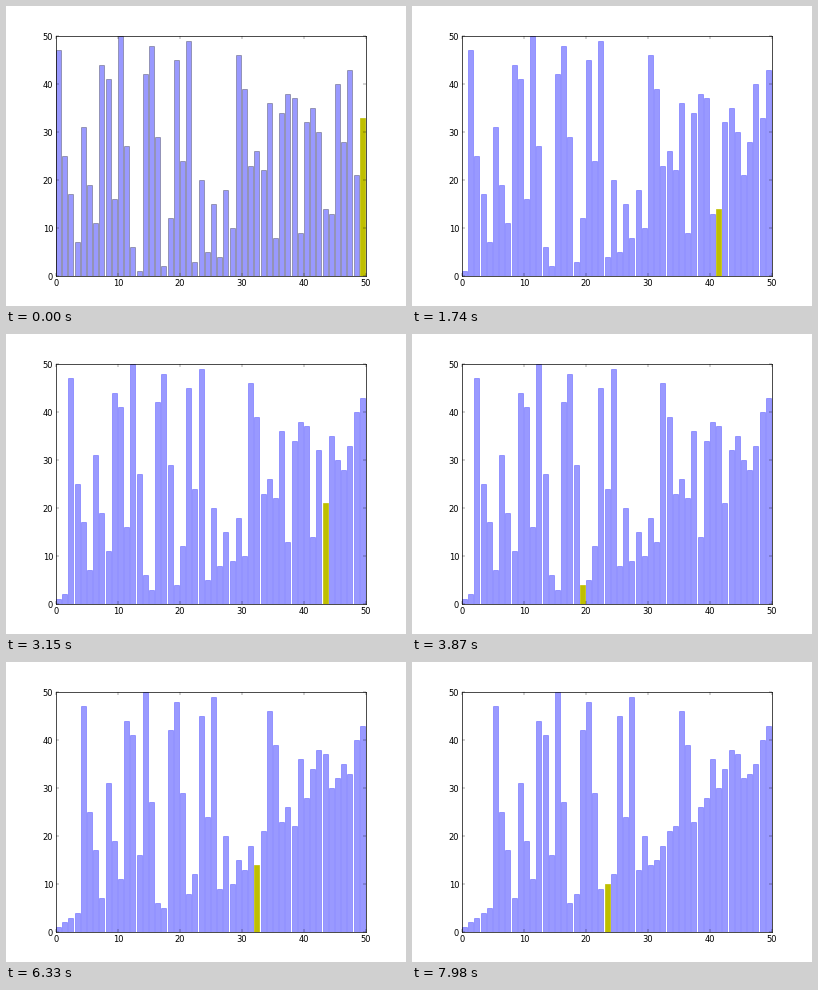
A matplotlib script for the animation above (8000 ms loop, 400 by 300 pixels).

```python
import matplotlib.pyplot as plt
from matplotlib.animation import FuncAnimation

LOOP_MS = 8000
FRAMES = 267

PLAIN = (0, 0, 1, 0.4)
OUTLINE = (0, 0, 0, 0.4)
ACTIVE = "y"

# The unsorted input: a shuffle of 1 to 50. Everything else follows from it.
SHUFFLED = [
    47, 25, 17, 7, 31, 19, 11, 44, 41, 16, 50, 27, 6, 1, 42, 48, 29,
    2, 12, 45, 24, 49, 3, 20, 5, 15, 4, 18, 10, 46, 39, 23, 26, 22,
    36, 8, 34, 38, 37, 9, 32, 35, 30, 14, 13, 40, 28, 43, 21, 33]
COUNT = len(SHUFFLED)


def bubble_sort(values):
    """Yield (active index, values) while small values sink to the left."""
    values = list(values)
    for first in range(COUNT):
        for j in reversed(range(first, COUNT)):
            pair = values[j:j + 2]
            values[j:j + 2] = sorted(pair)
            yield j, list(values)


def style_axes(ax):
    """Frame the plot with small inward ticks on all four sides."""
    ticks = range(0, COUNT + 1, 10)
    ax.set(xlim=(0, COUNT), ylim=(0, COUNT), xticks=ticks, yticks=ticks)
    ax.tick_params(direction="in", top=True, right=True,
                   length=4, width=0.5, pad=4, labelsize=12)
    ax.set_axisbelow(False)
    for spine in ax.spines.values():
        spine.set_linewidth(1)


def draw(n):
    active, values = steps[n]
    for i, (bar, value) in enumerate(zip(bars, values)):
        bar.set_height(value)
        if i == active:
            bar.set_color(ACTIVE)
        else:
            # Bars keep their dark outline until the first pass reaches them.
            visited = i >= COUNT - 1 - n
            bar.set_facecolor(PLAIN)
            bar.set_edgecolor(PLAIN if visited else OUTLINE)
    return bars.patches


plt.rcParams["font.family"] = "DejaVu Sans"
plt.rcParams["savefig.dpi"] = "figure"

steps = [step for _, step in zip(range(FRAMES), bubble_sort(SHUFFLED))]

fig = plt.figure(figsize=(8, 6), dpi=50, facecolor="white")
ax = fig.add_axes([0.125, 0.1, 0.775, 0.8])
bars = ax.bar(range(COUNT), SHUFFLED, width=0.8, align="edge", linewidth=1)
style_axes(ax)

anim = FuncAnimation(fig, draw, frames=FRAMES, interval=LOOP_MS / FRAMES,
                     repeat=True, repeat_delay=0, blit=False)
plt.show()
```
